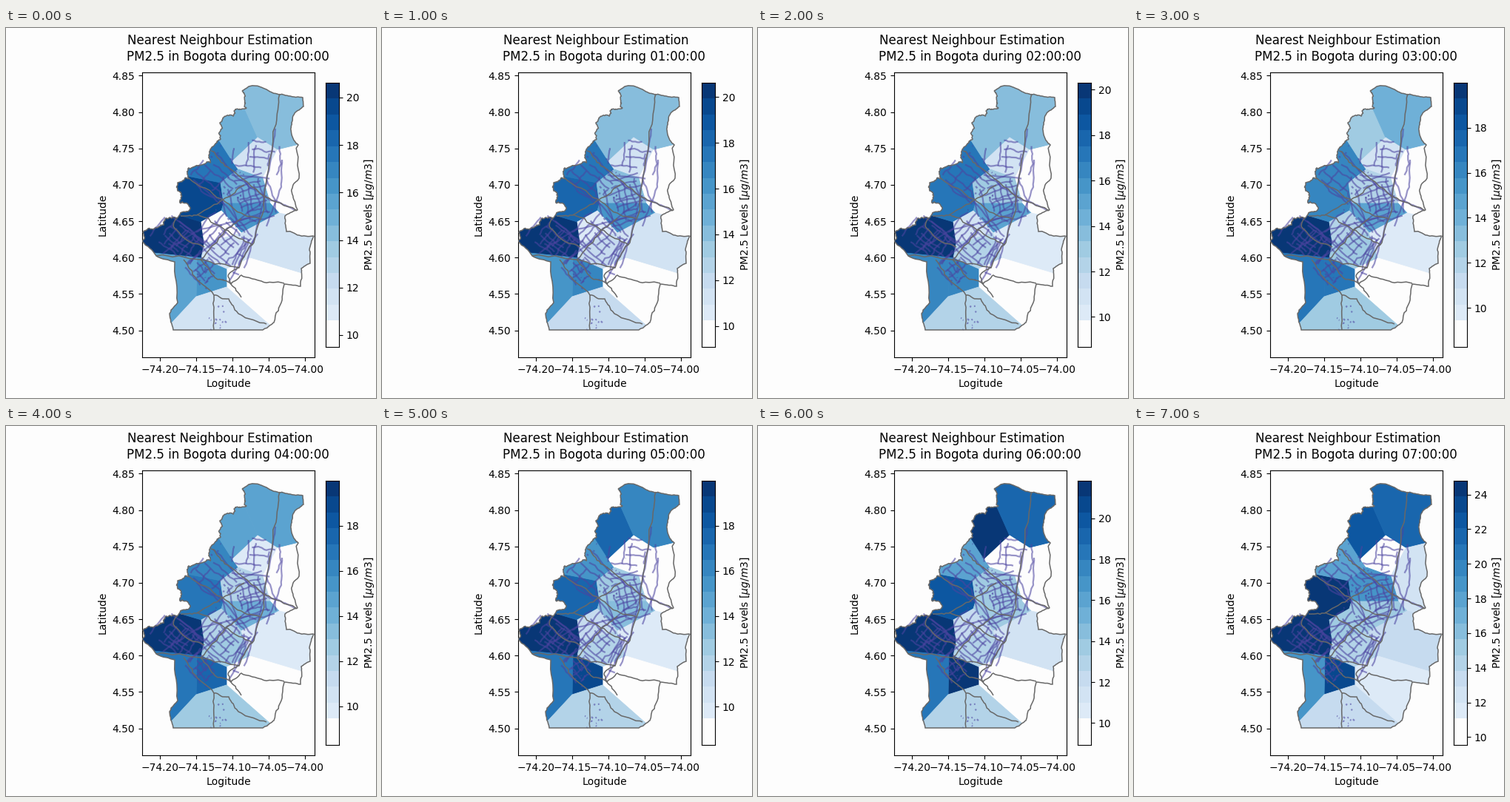
These frames come from a looping animation (500 px wide and 500 px high, 8 s). A matplotlib script:

```python
import numpy as np
import matplotlib.pyplot as plt
from matplotlib.animation import FuncAnimation
from matplotlib.collections import LineCollection
from matplotlib.colors import ListedColormap
from matplotlib.patches import PathPatch, Polygon
from matplotlib.path import Path

SIZE = 500
PAPER = "#fdfdfd"
GREY = "#686868"
ROAD = "#4c44a0"
rng = np.random.default_rng(7)


def points(*flat):
    return np.array(flat, float).reshape(-1, 2)


def rough(line, amount, passes=3):
    """Midpoint displacement: each pass adds a shaken point to every segment."""
    for _ in range(passes):
        step = np.diff(line, axis=0)
        reach = np.minimum(np.hypot(*step.T), 15)[:, None]
        mids = line[:-1] + step / 2 + rng.normal(0, amount, step.shape) * reach
        line = np.vstack([np.stack([line[:-1], mids], 1).reshape(-1, 2), line[-1:]])
    return line


# Key points of the city border in stage pixels, clockwise from the north.
EAST = points(
    319, 85, 328, 79, 336, 78, 352, 83, 369, 90, 384, 92, 401, 94, 402, 106,
    391, 114, 386, 128, 387, 147, 395, 158, 396, 203, 388, 212, 388, 229,
    394, 246, 377, 254, 379, 275, 396, 280, 416, 281, 410, 300, 411, 318,
    399, 325, 398, 349, 376, 346, 373, 368, 362, 398, 347, 408)
WEST = points(
    226, 408, 221, 386, 232, 371, 228, 316, 203, 308, 184, 288, 192, 271,
    213, 266, 217, 257, 231, 257, 249, 244, 236, 237, 236, 222, 232, 209,
    247, 203, 247, 189, 276, 182, 276, 164, 290, 150, 289, 128, 307, 119,
    308, 112, 325, 108, 319, 85)
border = Path(np.vstack([rough(EAST, .06), WEST[:1], rough(WEST[:6], .05),
                         rough(WEST[5:], .15, 4)]))

# Corners of the nearest-station cells; capitals lie outside the border.
CORNERS = dict(
    A=(308, 76), B=(425, 60), D=(420, 152), F=(270, 124), I=(215, 194),
    P=(200, 243), X=(180, 302), Y=(205, 419), Z=(374, 417), U=(430, 341),
    M=(425, 262), W=(175, 240),
    b=(340, 148), c=(367, 165), e=(306, 180), g=(314, 191), h=(290, 209),
    j=(294, 237), k=(291, 247), l=(357, 237), m=(369, 250), n=(318, 277),
    o=(347, 203), p=(264, 262), q=(268, 291), u=(330, 311), v=(298, 326),
    w=(264, 311), x=(258, 310), y=(257, 363), z=(298, 350))

# Each cell's corners and its place on the colour scale at the key hours.
KEY_HOURS = (0, 3, 6, 7)
CELLS = {
    "pqwxXWP": (1, 1, 1, 1), "IhjkpP": (.9, .64, .83, 1),
    "FeghI": (.75, .68, .57, .57), "AbeF": (.47, .38, .95, .84),
    "ABDcb": (.44, .47, .78, .76), "bcoge": (.18, .17, 0, 0),
    "cDMmlo": (0, 0, 0, .18), "goljh": (.47, .31, .38, .63),
    "jlmnk": (.62, .53, .36, .38), "pknq": (0, .31, .25, .37),
    "qnuvw": (.22, .38, .3, .32), "nmMUu": (.18, .12, .17, .24),
    "uUZzv": (0, 0, 0, .12), "xwvzy": (.6, .73, 1, .91),
    "XxyY": (.54, .75, .72, .62), "YyzZ": (.18, .36, .31, .24)}

# One white band at the foot of the scale, then equal steps of blue.
EDGES = np.array([0, *np.linspace(.1, 1, 16)])
BANDS = plt.get_cmap("Blues")((EDGES[:-1] + EDGES[1:]) / 2)
BANDS[0, :3] = .992

DISTRICTS = [
    points(370, 89, 365, 130, 349, 228, 335, 290, 315, 324, 300, 335),
    points(277, 166, 300, 188, 349, 228, 393, 247),
    points(247, 203, 291, 231, 318, 250, 343, 257),
    points(236, 254, 258, 253, 293, 232, 322, 212),
    points(231, 257, 226, 268, 241, 284, 268, 296),
    points(258, 252, 296, 273, 263, 313),
    points(318, 257, 296, 273, 333, 293),
    points(203, 308, 263, 313, 315, 324),
    points(240, 313, 252, 333, 281, 361, 281, 408),
    points(263, 313, 282, 337, 304, 346, 318, 364),
    points(300, 335, 304, 346, 318, 334, 345, 342, 376, 345),
    points(281, 361, 301, 366, 314, 386, 352, 400)]

AVENUES = [
    points(364, 136, 358, 175, 345, 245, 334, 288, 301, 343),
    points(373, 178, 372, 215, 352, 268),
    points(280, 167, 316, 205, 357, 233, 390, 246),
    points(253, 205, 292, 236, 333, 282),
    points(234, 261, 268, 291, 304, 322),
    points(212, 305, 262, 272, 343, 254),
    points(245, 320, 304, 268, 345, 236)]

# Street grids: centre, length, width, angle, lines along and across.
GRIDS = [
    (338, 176, 66, 46, 6, 5, 5),
    (280, 205, 58, 36, 40, 4, 4),
    (328, 234, 62, 58, -16, 9, 8),
    (234, 286, 62, 42, 38, 7, 8),
    (290, 282, 58, 56, 45, 7, 7),
    (266, 325, 36, 32, 50, 5, 4),
    (322, 296, 72, 18, 112, 4, 4)]


def streets(cx, cy, length, width, angle, along, across):
    """Parallel streets both ways, each covering a random part of the grid."""
    turn = np.radians(angle)
    ahead = np.array([np.cos(turn), np.sin(turn)])
    side = np.array([-ahead[1], ahead[0]])
    for run, gap, size, depth, n in ((ahead, side, length, width, along),
                                     (side, ahead, width, length, across)):
        for offset in np.linspace(-.5, .5, n) * depth:
            start, end = rng.uniform(-.5, -.1), rng.uniform(.1, .5)
            ends = np.array([[start], [end]]) * size * run
            yield rough((cx, cy) + ends + (offset + rng.normal(0, 1.5)) * gap, .07)


def specks(x, y, spread, count):
    for mid in rng.normal((x, y), spread, (count, 2)):
        yield np.array([mid, mid + rng.uniform(-2.5, 2.5, 2)])


roads = [rough(a, .05) for a in AVENUES]
for grid in GRIDS:
    roads += streets(*grid)
roads += specks(288, 393, (9, 14), 14)
roads += specks(265, 335, (9, 7), 12)
roads += specks(310, 210, (20, 30), 25)

plt.rcParams.update({"font.family": "DejaVu Sans", "font.size": 10,
                     "text.kerning_factor": 6})
fig = plt.figure(figsize=(5, 5), dpi=100, facecolor=PAPER)

# The map axes count in stage pixels, so one unit is one pixel.
ax = fig.add_axes([184 / SIZE, .11, 233 / SIZE, .77], facecolor=PAPER)
ax.set_xlim(184, 417)
ax.set_ylim(445, 60)
ax.set_xticks([208 + 49 * i for i in range(5)],
              [f"\u2212{74.2 - .05 * i:.2f}" for i in range(5)])
ax.set_yticks([408.5 - 49.15 * i for i in range(8)],
              [f"{4.5 + .05 * i:.2f}" for i in range(8)])
ax.set_xlabel("Logitude")
ax.set_ylabel("Latitude")

cells = []
for names in CELLS:
    cell = Polygon([CORNERS[c] for c in names], linewidth=.6, zorder=1)
    ax.add_patch(cell)
    cell.set_clip_path(border, ax.transData)
    cells.append(cell)
ax.add_collection(LineCollection(roads, colors=ROAD, linewidths=1.6,
                                 alpha=.57, zorder=2), autolim=False)
ax.add_collection(LineCollection([rough(d, .07) for d in DISTRICTS], colors=GREY,
                                 linewidths=1.1, zorder=3), autolim=False)
ax.add_patch(PathPatch(border, fill=False, edgecolor=GREY, linewidth=1.1, zorder=3))

bar = fig.add_axes([432 / SIZE, 69 / SIZE, 18 / SIZE, 357 / SIZE])
bar.pcolormesh([0, 1], EDGES, np.arange(len(BANDS))[:, None],
               cmap=ListedColormap(BANDS))
bar.set_xticks([])
bar.set_ylim(0, 1)
bar.yaxis.tick_right()
bar.yaxis.set_label_position("right")
bar.set_ylabel(r"PM2.5 Levels [$\mu g/m3$]", labelpad=3.3)

fig.text(164 / SIZE, 1 - 22.5 / SIZE, "Nearest Neighbour Estimation", size=12)
clock = fig.text(163 / SIZE, 1 - 44.5 / SIZE, "", size=12)


def shade(level):
    band = np.searchsorted(EDGES, level, side="right") - 1
    return BANDS[min(band, len(BANDS) - 1)]


def draw(hour):
    for cell, levels in zip(cells, CELLS.values()):
        cell.set_color(shade(np.interp(hour, KEY_HOURS, levels)))
    low = np.interp(hour, (0, 3, 5, 7), (9.5, 8.27, 8.3, 9.55))
    high = np.interp(hour, (1, 3, 5, 6, 7), (20.62, 19.99, 19.99, 21.84, 24.79))
    ticks = np.arange(np.ceil(low / 2) * 2, high, 2)
    bar.set_yticks((ticks - low) / (high - low), [f"{t:.0f}" for t in ticks])
    clock.set_text(f"PM2.5 in Bogota during {hour:02d}:00:00")
    return [*cells, clock]


anim = FuncAnimation(fig, draw, frames=8, interval=1000, repeat=True,
                     repeat_delay=0, blit=False)
plt.show()
```
